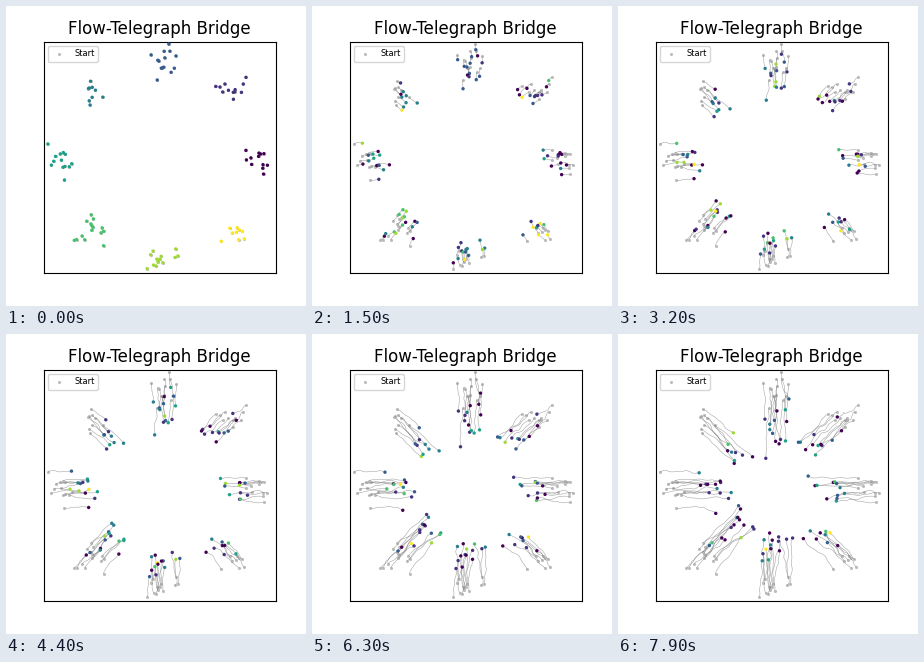
Write a matplotlib script that moves like this. It is 300 px wide and 300 px high and loops after 8 s.

```python
import numpy as np
import matplotlib.pyplot as plt
from matplotlib.animation import FuncAnimation
from matplotlib.collections import LineCollection

FRAMES, INTERVAL = 80, 100
STATES = 8
COUNTS = [12, 12, 14, 9, 13, 15, 14, 9]   # particles per cluster
CENTER, RADIUS, SPREAD = np.array([157, 156]), 100, 9
JUMP_RATE = 0.09                          # chance of a state change per step

rng = np.random.default_rng(7)


def make_paths():
    """Ring of Gaussian clusters drifting inward along wavering lines."""
    group = np.repeat(np.arange(STATES), COUNTS)
    angle = group * 2 * np.pi / STATES
    out = np.stack([np.cos(angle), -np.sin(angle)], axis=1)
    side = np.stack([-out[:, 1], out[:, 0]], axis=1)
    n = len(group)

    offset = rng.normal(0, SPREAD, (n, 2)).clip(-2 * SPREAD, 2 * SPREAD)
    start = CENTER + RADIUS * out + offset
    # Particles nearer the center travel further.
    inner = -(offset * out).sum(axis=1)
    reach = 40 - 5 * np.cos(angle) + 0.6 * inner + rng.normal(0, 3, n)
    drift = -reach[:, None] * out + rng.normal(0, 4, (n, 1)) * side

    u = np.linspace(0, 1, FRAMES)[None, :, None]
    waver = sum(rng.normal(0, 1.3 / k, (n, 1, 2)) * np.sin(k * np.pi * u)
                for k in range(1, 9))
    return group, start[:, None] + u * drift[:, None] + waver


def make_states(first):
    """Telegraph process: hold a state, then jump, mostly to low ones."""
    weights = 0.72 ** np.arange(STATES)
    weights /= weights.sum()
    track = [first]
    for _ in range(FRAMES - 1):
        jump = rng.random(len(first)) < JUMP_RATE
        fresh = rng.choice(STATES, len(first), p=weights)
        track.append(np.where(jump, fresh, track[-1]))
    return np.array(track)


group, paths = make_paths()
colors = plt.get_cmap("viridis")(make_states(group) / (STATES - 1))

fig, ax = plt.subplots(figsize=(3, 3), dpi=100)
ax.set_title("Flow-Telegraph Bridge")
ax.set(xlim=(37.5, 270), ylim=(267, 36), xticks=[], yticks=[])

ax.scatter(*paths[:, 0].T, s=5, c="0.74", lw=0, zorder=1, label="Start")
trails = ax.add_collection(
    LineCollection([], colors="gray", linewidths=0.4, alpha=0.7, zorder=2))
dots = ax.scatter(*paths[:, 0].T, s=6, c=colors[0], lw=0, zorder=3)
ax.legend(loc="upper left", fontsize=6)


def update(i):
    trails.set_segments(list(paths[:, :i + 1]))
    dots.set_offsets(paths[:, i])
    dots.set_facecolor(colors[i])
    return trails, dots


anim = FuncAnimation(fig, update, frames=FRAMES, interval=INTERVAL,
                     repeat=True, repeat_delay=0)
plt.show()
```
